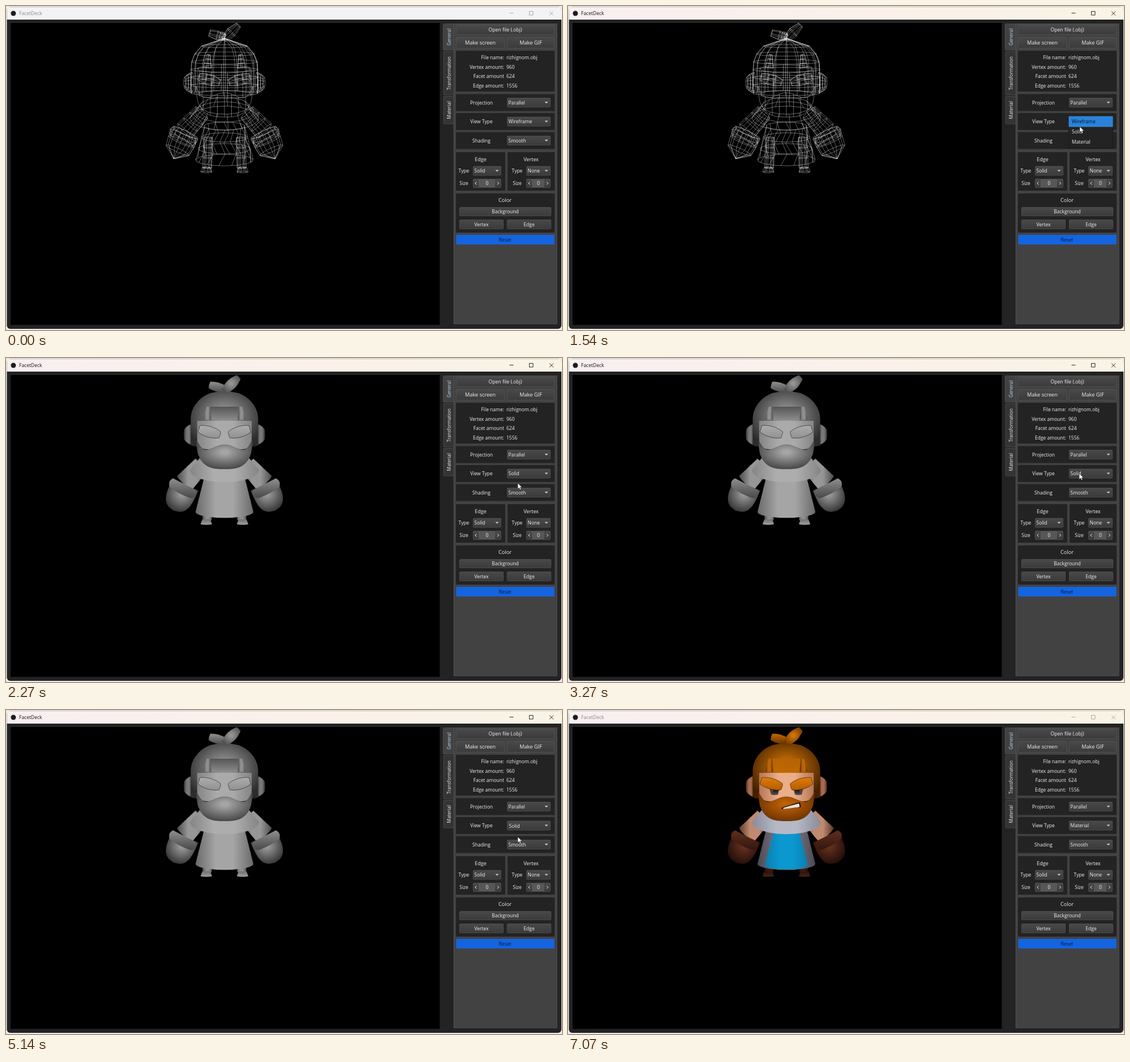
An HTML page that plays this animation: 980x572 px, repeating every 7200 ms.

```html
<!DOCTYPE html>
<html lang="en">
<head>
<meta charset="utf-8">
<title>FacetDeck</title>
<style>
html, body { margin: 0; width: 100%; height: 100%; overflow: hidden; background: #ececec; }
svg { display: block; width: 100vw; height: 100vh; }
text { font-family: "Open Sans", "Noto Sans", sans-serif; white-space: pre; }
</style>
</head>
<body>
<svg id="stage" viewBox="0 0 980 572"></svg>
<script>
const LOOP = 7200, AXIS = 385;
const defs = [], ui = [];
const layers = { wire: [], solid: [], material: [] };
const { PI, sin, cos, sqrt, min, abs } = Math;
const span = (n, end = 1) => Array.from({ length: n + 1 }, (_, i) => i / n * end);

// ---- drawing helpers ----
const rect = (x, y, x2, y2, fill, extra = '') =>
  `<rect x="${x}" y="${y}" width="${x2 - x}" height="${y2 - y}" fill="${fill}" ${extra}/>`;
const text = (x, y, label, { anchor = 'middle', size = 8.5, fill = '#f2f2f2', extra = '' } = {}) =>
  `<text x="${x}" y="${y + 3}" text-anchor="${anchor}" font-size="${size}" fill="${fill}" ${extra}>${label}</text>`;

function gradient(kind, light, dark) {
  const id = 'g' + defs.length;
  const stop = (at, color) => `<stop offset="${at}" stop-color="${color}"/>`;
  if (kind === 'round')
    defs.push(`<radialGradient id="${id}" cy=".45" r=".6">${stop(.1, light)}${stop(1, dark)}</radialGradient>`);
  else if (kind === 'sides')
    defs.push(`<linearGradient id="${id}">${stop(0, dark)}${stop(.35, light)}${stop(.65, light)}${stop(1, dark)}</linearGradient>`);
  else
    defs.push(`<linearGradient id="${id}" x2="0" y2="1">${stop(0, light)}${stop(1, dark)}</linearGradient>`);
  return `url(#${id})`;
}

// ---- widgets ----
const buttonFill = gradient('down', '#494949', '#3b3b3b');
const box = (x, y, x2, y2) => rect(x + .5, y + .5, x2 - .5, y2 - .5, buttonFill, 'rx="1.2" stroke="#565656" stroke-width=".7"');
const group = (y, y2, x = 793, x2 = 967) => ui.push(rect(x, y, x2, y2, '#232323', 'rx="1"'));
const label = (...args) => ui.push(text(...args));

function button(x, y, x2, y2, caption, size) {
  ui.push(box(x, y, x2, y2), text((x + x2) / 2, (y + y2) / 2, caption, { size }));
}
function combo(x, x2, cy, caption, id = '') {
  const cx = x2 - 7.5;
  ui.push(box(x, cy - 8.5, x2, cy + 8.5),
    text(x + 2.5, cy, caption, { anchor: 'start', extra: `id="${id}"` }),
    `<path d="M${cx - 3} ${cy - 1.5}h6l-3 3z" fill="#d0d0d0"/>`);
}
function spinner(x, x2, cy) {
  ui.push(box(x, cy - 8, x2, cy + 8), rect(x + 10, cy - 7, x2 - 11, cy + 7, '#575757'));
  label((x + x2) / 2, cy, '0');
  ui.push(`<path d="M${x + 6.5} ${cy - 2.5}l-2.5 2.5 2.5 2.5M${x2 - 7} ${cy - 2.5}l2.5 2.5-2.5 2.5" fill="none" stroke="#eee"/>`);
}
function tab(y, y2, caption, selected) {
  ui.push(rect(selected ? 770.5 : 771.5, y, 789.5, y2, selected ? '#424242' : '#343434', 'rx="1" stroke="#525252" stroke-width=".8"'),
    text(0, 0, caption, { size: 8.2, fill: selected ? '#b4d8f4' : '#f2f2f2', extra: `transform="translate(781 ${(y + y2) / 2}) rotate(-90)"` }));
}

function buildWindow() {
  defs.push('<linearGradient id="warm"><stop stop-color="#f8eff0"/><stop offset=".55" stop-color="#fbf1ea"/><stop offset="1" stop-color="#f8f4e5"/></linearGradient>');
  ui.push(rect(1.5, 1.5, 979, 570, '#232323', 'rx="6"'),
    '<path id="bar" d="M1.5 24V7q0-5.5 6-5.5H973q6 0 6 5.5V24z"/>',
    '<circle cx="13" cy="13" r="4.5" fill="#1c1c1c"/>',
    text(23, 13, 'FacetDeck', { anchor: 'start', extra: 'id="caption"' }),
    '<path id="controls" d="M887.5 12.5h7M922.5 9.5h6.5v6.5h-6.5zM958 9.5l7 7m0-7l-7 7" fill="none" stroke-width=".9"/>',
    rect(8, 30, 764.5, 563, '#000'),
    rect(789.5, 31.5, 971, 561, '#424242', 'stroke="#5c5c5c" stroke-width=".8"'));
  tab(31.5, 78, 'General', true);
  tab(80.5, 157, 'Transformation');
  tab(159.5, 208, 'Material');

  button(793, 33, 967, 51, 'Open file (.obj)', 8.7);
  button(793, 55, 879, 75, 'Make screen', 9.2);
  button(883, 55, 967, 75, 'Make GIF', 9.2);

  group(79, 151);
  Object.entries({ 'File name:': 'rizhignom.obj', 'Vertex amount:': 960, 'Facet amount': 624, 'Edge amount:': 1556 })
    .forEach(([name, value], i) => {
      label(878, 91 + i * 16.6, name, { anchor: 'end' });
      label(882, 91 + i * 16.6, value, { anchor: 'start' });
    });

  Object.entries({ Projection: 'Parallel', 'View Type': 'Wireframe', Shading: 'Smooth' })
    .forEach(([name, value], i) => {
      const y = 170.5 + 33.5 * i;
      group(y - 15, y + 15);
      label(838, y, name);
      combo(883, 960, y, value, name);
    });

  [['Edge', 'Solid', 793, 880, 823, 873], ['Vertex', 'None', 884, 967, 917, 960]]
    .forEach(([name, value, left, right, from, to]) => {
      group(258, 326, left, right);
      label((left + right) / 2, 271, name, { size: 9 });
      label(from - 16, 291, 'Type');
      label(from - 16, 313, 'Size');
      combo(from, to, 291, value);
      spinner(from, to, 313);
    });

  group(331, 400);
  label(879.5, 343, 'Color', { size: 9.2 });
  button(799, 355, 961, 371, 'Background');
  button(799, 377, 877, 394, 'Vertex');
  button(883, 377, 961, 394, 'Edge');
  ui.push(rect(793.5, 404, 966.5, 421, '#1464e0'));
  label(879.5, 413, 'Reset', { fill: '#0b1a35' });
}

// ---- figure ----
const WIRE = 'fill="none" stroke="#fff" stroke-opacity=".65" stroke-width=".6"';
const line = points => 'M' + points.map(p => p.map(k => k.toFixed(1))).join('L');

// "gray" and "tint" are "light dark" colours; a part without one is absent from that view.
function paint(outline, mesh, { kind = 'sides', gray, tint, pair, edge = 'none' }) {
  const add = (layer, path, attrs) => {
    const shape = `<path d="${path}" ${attrs}/>`;
    layers[layer].push(pair ? shape + `<g transform="translate(${2 * AXIS}) scale(-1 1)">${shape}</g>` : shape);
  };
  const fill = colors => `fill="${gradient(kind, ...colors.split(' '))}" stroke="${edge}"`;
  if (gray) add('solid', outline, fill(gray));
  if (tint) add('material', outline, fill(tint));
  if (mesh) add('wire', mesh, WIRE);
}

// A surface of revolution: radius(u) along an axis turned from straight down.
function turned(x, y, turn, length, radius, { n = 8, rings = 3, squash = .15, twist = 0, wire = true, ...look }) {
  const at = (u, a) => {
    const across = radius(u) * cos(a), along = u * length + radius(u) * squash * sin(a);
    return [x + across * cos(turn) - along * sin(turn), y + across * sin(turn) + along * cos(turn)];
  };
  const side = span(20);
  const outline = line([...side.map(u => at(u, 0)), ...span(12, PI).map(a => at(1, a)), ...side.reverse().map(u => at(u, PI))]) + 'Z';
  const levels = span(rings), around = span(n, 2 * PI).map(a => a + .2);
  const mesh = levels.map(u => line(around.map(a => at(u, a)))).join('') +
    around.map(a => line(levels.map((u, i) => at(u, a + (i % 2) * twist)))).join('');
  paint(outline, wire && mesh, look);
}

function buildFigure() {
  // body
  turned(356, 232, .03, 54, () => 8, { n: 6, pair: true, gray: '#8c8c8c #555555', tint: '#3a1b14 #1c0c07' });
  turned(353, 285, 0, 8, u => 7 + 3 * u, { n: 6, rings: 1, pair: true, kind: 'down', gray: '#707070 #a0a0a0', tint: '#2c140d #46211a' });
  turned(385, 212, 0, 60, u => 36 + 15 * u, { n: 14, twist: .22, squash: .2, gray: '#a5a5a5 #6a6a6a', tint: '#777480 #4b4954' });
  turned(385, 214, 0, 60, u => 22 + 16 * u, { wire: false, squash: .2, tint: '#0a98cf #087fb2' });
  turned(345, 188, .75, 44, u => 15 + 3 * u, { pair: true, gray: '#969696 #4b4b4b', tint: '#c08a70 #5d3a2c' });
  turned(316, 224, .42, 50, u => 25 * sqrt(1 - u ** 4), { n: 9, pair: true, kind: 'round', gray: '#989898 #303030', tint: '#62301f #200c07' });
  turned(315, 223, .48, 15, u => 23 + 3 * sin(PI * u), { rings: 2, pair: true, kind: 'down', gray: '#8f8f8f #484848', tint: '#5f2e1e #33170e' });
  turned(385, 176, 0, 22, u => 43 + 18 * u, { n: 15, rings: 2, squash: .35, gray: '#adadad #858585', tint: '#b6b8c6 #898b99' });

  // head
  turned(328, 135, PI / 2, 13, u => 18 - 8 * u * u, { pair: true, gray: '#777777 #383838', tint: '#a66a4f #4c2c20' });
  const dome = u => 59.5 * sqrt(1 - (1 - min(1, u * 1.9)) ** 2);
  turned(385, 57, 0, 97, dome, { n: 18, rings: 7, squash: .07, kind: 'round', gray: '#9c9c9c #2c2c2c', tint: '#d17505 #432000' });
  turned(385, 111, 0, 45, () => 48, { n: 10, rings: 2, gray: '#aaaaaa #858585', tint: '#eaae89 #b67656' });
  turned(385, 86, 0, 24, () => 25, { wire: false, squash: 0, kind: 'down', gray: '#555555 #8d8d8d', tint: '#b76303 #bd6904' });
  turned(357, 86, .1, 23, u => 3 + 4 * u, { n: 4, squash: 0, pair: true, gray: '#8f8f8f #444444', tint: '#bb6603 #512600' });

  const beardTop = s => 153 + 45 * s ** 2 - 56 * s ** 4;
  const beardBottom = s => 150 + 46 * sqrt(1 - abs(s) ** 3);
  const sweep = span(32, 2).map(k => k - 1), curve = f => sweep.map(s => [AXIS + 50 * s, f(s)]);
  const beard = line([...curve(beardTop), ...curve(beardBottom).reverse()]) + 'Z';
  const strands = sweep.filter((_, i) => i % 4 === 0).map(s => line([beardTop, beardBottom].map(f => [AXIS + 50 * s, f(s)])));
  paint(beard, beard + strands.join(''), { kind: 'round', gray: '#a5a5a5 #404040', tint: '#bd6104 #6a3000', edge: '#0003' });

  // face
  turned(364, 139, 0, 10, u => 9 - 3 * u, { wire: false, pair: true, tint: '#4a3a36 #6b4a3c' });
  turned(366, 141, 0, 8, () => 4, { wire: false, pair: true, kind: 'down', tint: '#121214 #55525a' });
  turned(340, 125, -1.29, 38, u => 9.5 * sqrt(sin(PI * (.12 + .76 * u))), { n: 4, pair: true, kind: 'down', gray: '#acacac #929292', tint: '#df7c06 #b45c00', edge: '#0008' });
  const mouth = (x, length, width, tint) =>
    turned(x, 174, -1.77, length, u => .5 + width * sqrt(u), { wire: false, kind: 'down', tint });
  mouth(376, 34, 4, '#241008 #351509');
  mouth(379, 29, 2.6, '#f7f3ea #d8d2c6');

  // tuft
  turned(386, 55, 1.84, 28, u => 3 + 5 * sin(PI * (.2 + .6 * u)), { n: 5, rings: 2, kind: 'down', gray: '#8f8f8f #4d4d4d', tint: '#c46a02 #633000' });
  turned(384, 59, -2.34, 36, u => 5 + 4 * sin(PI * u), { n: 6, rings: 2, kind: 'round', gray: '#949494 #4c4c4c', tint: '#d07405 #6e3500' });
  turned(382, 48, .2, 11, () => 5, { n: 7, rings: 1, squash: .4 });
}

buildWindow();
buildFigure();
const NAMES = ['Wireframe', 'Solid', 'Material'];
const figures = Object.entries(layers).map(([name, parts]) => `<g id="${name}">${parts.join('')}</g>`).join('');
const popup = `<g id="popup">${rect(882.5, 194.5, 960.5, 251, '#232323', 'stroke="#191919"')}
  ${rect(883, 195, 960, 213, '#2a82da', 'id="highlight" stroke="#4b9be8" stroke-width=".7"')}
  ${NAMES.map((name, i) => text(888, 204 + 18 * i, name, { anchor: 'start', extra: 'class="item"' })).join('')}</g>`;
const arrow = '<path id="cursor" d="M0 0v10.2l2.5-2.2 1.6 3.6 1.8-.8-1.6-3.5h3.3z" fill="#fff" stroke="#222" stroke-width=".6"/>';
const $ = id => document.getElementById(id);
$('stage').innerHTML = `<defs>${defs.join('')}</defs>${ui.join('')}${figures}${popup}${arrow}`;

// ---- motion ----
const STEP = 67; // the pointer is redrawn at this interval, in ms
const easeOut = p => 1 - (1 - p) ** 1.7, easeIn = p => p ** 1.7, linear = p => p;
const moves = [ // first change, last change, destination, easing
  [180, 850, 900, 214, easeOut],
  [910, 1130, 901, 205, linear],
  [1400, 1540, 902, 213, linear],
  [1610, 1750, 902, 221, linear],
  [2730, 3270, 901, 204, linear],
  [4280, 4400, 902, 224, linear],
  [6200, 6880, 857, 576, easeIn],
];
function cursorAt(t) {
  let x = 959, y = 576;
  for (const [start, end, toX, toY, ease] of moves) {
    if (t < start) break;
    const count = Math.round((end - start) / STEP) + 1;
    const done = t >= end ? count : Math.floor((t - start) / STEP) + 1;
    const p = ease(min(1, done / count));
    x += (toX - x) * p;
    y += (toY - y) * p;
  }
  return [x, y];
}
const within = (t, from, to) => t >= from && t < to;

function render(t) {
  const active = within(t, 1130, 7070);
  $('bar').setAttribute('fill', t < 1130 ? '#f3f3f3' : 'url(#warm)');
  $('caption').setAttribute('fill', active ? '#151515' : '#8b8b8b');
  $('controls').setAttribute('stroke', active ? '#111' : '#a0a0a0');

  const show = (id, on) => $(id).setAttribute('visibility', on ? 'visible' : 'hidden');
  const view = t < 2270 ? 0 : t < 5210 ? 1 : 2;
  Object.keys(layers).forEach((name, i) => show(name, i === view));
  const pressed = within(t, 2140, 2270) || within(t, 5140, 5210);
  $('View Type').textContent = NAMES[view];
  $('View Type').setAttribute('transform', pressed ? 'translate(1 .7)' : '');

  show('popup', within(t, 1200, 2140) || within(t, 3930, 5140));
  const fading = within(t, 2070, 2140) || within(t, 3930, 4060) || within(t, 5010, 5140);
  $('popup').setAttribute('opacity', fading ? .6 : 1);
  $('popup').setAttribute('transform', `translate(0 ${-18 * view})`);
  const chosen = view + (t >= (view ? 4340 : 1610) ? 1 : 0);
  $('highlight').setAttribute('y', 195 + 18 * chosen);
  document.querySelectorAll('.item').forEach((item, i) =>
    item.setAttribute('fill', i === chosen ? '#06121f' : '#f2f2f2'));

  $('cursor').setAttribute('transform', `translate(${cursorAt(t)})`);
}

const began = performance.now();
(function frame() {
  render((performance.now() - began) % LOOP);
  requestAnimationFrame(frame);
})();
</script>
</body>
</html>
```
